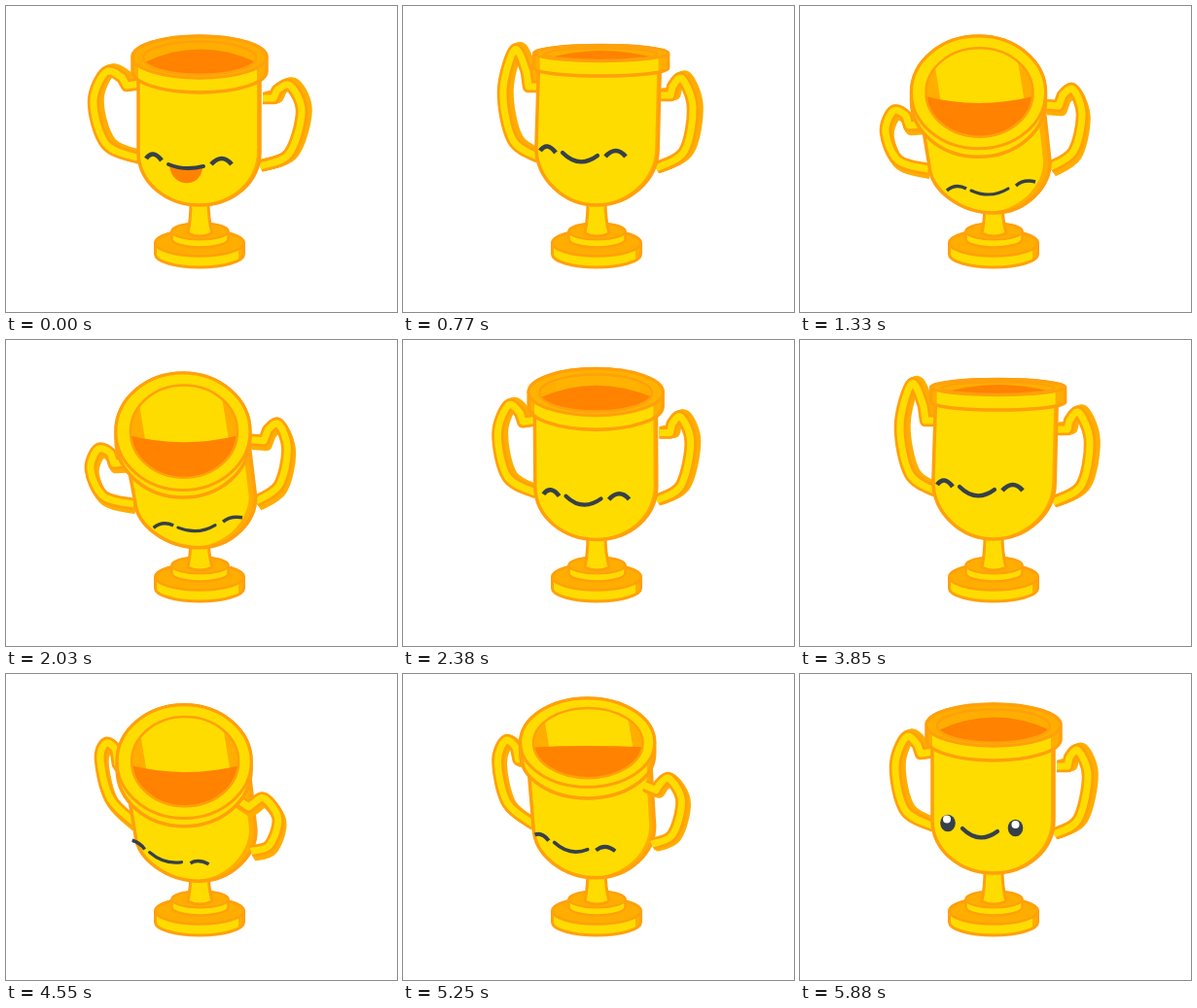
An HTML page with a canvas that plays this animation: 402x315 px, repeating every 6300 ms.

```html
<!DOCTYPE html>
<html lang="en">
<head>
<meta charset="utf-8">
<title>Happy cup</title>
<style>
  html, body { margin: 0; width: 100%; height: 100%; overflow: hidden; background: #fff; }
  canvas { display: block; width: 402px; height: 315px; }
</style>
</head>
<body>
<canvas id="stage" width="402" height="315"></canvas>
<script>
const g = document.getElementById('stage').getContext('2d');
const LOOP = 6300, STEP = 70;
const YELLOW = '#ffdc00', AMBER = '#ffae00', LINE = '#ffa00c', DEEP = '#ff8200', INK = '#36404a';

// Handle points: rim, elbow, knuckle, top, side, low, foot.
const rest = {
  left: [138,80, 124,82, 121,73, 109,65, 98,95, 108,140, 138,157],
  right: [264,95, 275,95, 277,86, 286,79, 296,105, 286,150, 261,165]
};
const back = {
  left: [139,83, 129,83, 127,68, 115,45, 103,88, 113,138, 140,156],
  right: [262,92, 275,92, 277,83, 287,75, 298,105, 289,150, 260,167]
};
const bowRight = {
  left: [126,122, 112,123, 109,113, 96,108, 88,130, 101,159, 132,168],
  right: [252,102, 266,103, 270,92, 281,86, 290,112, 281,150, 257,166]
};
const bowLeft = {
  left: [122,92, 115,92, 113,78, 103,71, 97,88, 107,128, 132,153],
  right: [238,128, 250,136, 255,132, 266,127, 280,148, 271,176, 252,182]
};
// Face arcs (start, control, end): left eye, mouth, right eye.
rest.face = [144,157, 151,147, 160,159, 167,159, 184,176, 203,162, 211,163, 222,151, 232,163];
bowRight.face = [151,190, 160,182, 171,188, 176,190, 196,199, 214,188, 222,185, 230,178, 242,181];
bowLeft.face = [130,171, 138,173, 143,180, 148,183, 163,196, 181,193, 190,194, 198,189, 209,195];
back.face = rest.face.map((v, i) => v + (i % 2 ? -8 : -3));

// Tilt over a bow: [step, tilt]; 0 upright, 1 bowed, below 0 leaning back.
const tiltKeys = [[-1,0], [4,-.3], [5,-.3], [9,.67], [12,1], [22,1.1], [25,.6], [28.5,-.3], [34,0]];

const mix = (a, b, k) => a + (b - a) * k;
const blend = (a, b, k) => a.map((v, i) => mix(v, b[i], k));
const clamp = v => Math.min(1, Math.max(0, v));

function tiltAt(s) {
  if (s <= -1 || s >= 34) return 0;
  const i = tiltKeys.findIndex(k => s < k[0]);
  const [s0, v0] = tiltKeys[i - 1], [s1, v1] = tiltKeys[i];
  const u = (s - s0) / (s1 - s0);
  return mix(v0, v1, u * u * (3 - 2 * u));
}

function shade(k) {
  return `rgb(255,${Math.round(mix(174, 220, clamp(k)))},0)`;
}

function paint(path, fill, stroke, width) {
  if (fill) { g.fillStyle = fill; g.fill(path); }
  if (stroke) { g.strokeStyle = stroke; g.lineWidth = width; g.stroke(path); }
}

function oval(x, y, rx, ry) {
  const p = new Path2D();
  p.ellipse(x, y, rx, ry, 0, 0, 7);
  return p;
}

function drum(x, y, rx, ry, h) {
  const p = new Path2D();
  p.ellipse(x, y, rx, ry, 0, Math.PI, 2 * Math.PI);
  p.ellipse(x, y + h, rx, ry, 0, 0, Math.PI);
  p.closePath();
  return p;
}

function clipped(path, draw) {
  g.save();
  g.clip(path);
  draw();
  g.restore();
}

function drawBase() {
  const low = drum(199, 244, 45.5, 13.5, 11.5);
  paint(low, YELLOW);
  clipped(low, () => { g.fillStyle = AMBER; g.fillRect(239, 240, 10, 32); });
  paint(low, null, LINE, 3);
  paint(oval(199, 244, 45.5, 13.5), AMBER, LINE, 2.5);
  paint(drum(199.5, 232, 29, 8.5, 8), YELLOW, LINE, 2.5);
  paint(oval(199.5, 232, 29, 8.5), AMBER, LINE, 2);
  paint(new Path2D('M190 200 Q190 220 187 234 Q199 240 212 234 Q208 220 208 200Z'), YELLOW, LINE, 3);
}

function handlePath(p) {
  const path = new Path2D();
  const at = i => [p[2 * i], p[2 * i + 1]];
  path.moveTo(...at(0));
  path.lineTo(...at(1));
  path.lineTo(...at(2));
  for (let i = 2; i < 6; i++) {
    const a = at(i - 1), b = at(i), c = at(i + 1), d = at(Math.min(6, i + 2));
    path.bezierCurveTo(b[0] + (c[0] - a[0]) / 6, b[1] + (c[1] - a[1]) / 6,
      c[0] - (d[0] - b[0]) / 6, c[1] - (d[1] - b[1]) / 6, ...c);
  }
  return path;
}

function drawHandle(points, q) {
  const path = handlePath(points), f = clamp(q);
  g.lineJoin = 'round';
  for (let i = 4; i >= 0; i--) {
    g.save();
    g.translate(mix(4.5, 2.5, f) * i / 4, mix(-1.5, 4, f) * i / 4);
    paint(path, null, i ? AMBER : LINE, 12.5);
    g.restore();
  }
  paint(path, null, YELLOW, 7);
}

function drawBody(q) {
  const tl = [136 - 12 * q, 70 + 40 * q], sl = [136 - 3 * q, 150 + 15 * q];
  const tr = [261 - 11 * q, 70 + 25 * q], sr = [261 - 4 * q, 150 + 10 * q];
  const bottom = 205 + 8 * Math.max(0, q), f = clamp(q);
  const drop = 32 - 7 * f;
  const p = new Path2D();
  p.moveTo(...tl);
  p.lineTo(...sl);
  p.bezierCurveTo(sl[0] + 2 * f, sl[1] + drop, 165, bottom, 199, bottom);
  p.bezierCurveTo(233, bottom, sr[0] + f, sr[1] + drop, ...sr);
  p.lineTo(...tr);
  p.closePath();
  paint(p, AMBER);
  clipped(p, () => {
    g.translate(-3 - 4 * f, -1);
    paint(p, YELLOW);
    g.fillStyle = YELLOW;
    g.fillRect(120, 90, 60, 130);
  });
  paint(p, null, LINE, 3.5);
}

function drawRim(q) {
  const e = (18.3 + 38.7 * q) * Math.PI / 180, f = clamp(q);
  const x = 199 - 15.5 * q, y = 138 - 90 * Math.cos(e);
  const rx = 69, ry = 69 * Math.sin(e), h = 15.5 * Math.cos(e);
  const band = drum(x, y, rx, ry, h);
  paint(band, YELLOW);
  clipped(band, () => {
    g.fillStyle = AMBER;
    g.fillRect(x - 72, y, 9 - 3 * f, 90);
    g.fillRect(x + 59 + 4 * f, y, 14, 90);
  });
  paint(band, null, LINE, 3.5);
  paint(oval(x, y, rx, ry), shade(q * 2), LINE, 3);

  const ix = 58 - 3 * f, iy = ry * .79;
  const hole = oval(x + f, y + 1 - f, ix, iy);
  paint(hole, shade(q * 2));
  clipped(hole, () => {
    g.translate(x, y);
    paint(new Path2D('M-70 -60L-50 -60L-38 14L-70 14Z M70 -60L36 -60L48 14L70 14Z'), AMBER);
    const edge = mix(6, 4, f), mid = mix(-22, 18, f) * (q < 0 ? 1 + q * 1.6 : 1);
    paint(new Path2D(`M${-ix} ${edge}Q0 ${mid} ${ix + 2} ${edge}V80H${-ix}Z`), DEEP);
  });
  paint(hole, null, LINE, 2.5);
}

function drawFace(a, q, open, laugh) {
  const arc = i => new Path2D(
    `M${a[i]} ${a[i + 1]}Q${a[i + 2]} ${a[i + 3]} ${a[i + 4]} ${a[i + 5]}`);
  const width = 4.6 - clamp(q) * 1.1;
  if (open) {
    [[152, 153.5, 151, 149.5], [221.5, 158.5, 221.5, 155]].forEach(([x, y, hx, hy]) => {
      paint(oval(x, y, 7.8, 8.8), INK);
      paint(oval(hx, hy, 4, 4), '#fff');
    });
  } else {
    paint(arc(0), null, INK, width);
    paint(arc(12), null, INK, width);
  }
  g.lineCap = 'round';
  if (laugh > 0) {
    const d = 166 + 17 * laugh;
    paint(new Path2D(`M168 164Q185 170 202 166C201 ${d + 5} 170 ${d + 5} 168 164Z`), DEEP);
    const lip = mix(176, 170, laugh);
    paint(new Path2D(`M167 ${mix(159, 163, laugh)}Q184 ${lip} 203 ${mix(162, 165, laugh)}`), null, INK, 4);
  } else {
    paint(arc(6), null, INK, width - .4);
  }
  g.lineCap = 'butt';
}

function spread(points, side, k) {
  const weight = [0, 0, .2, .8, 1, .6, 0];
  return points.map((v, i) => v + k * (i % 2 ? 4 * weight[i >> 1] : side * 8 * weight[i >> 1]));
}

function draw(t) {
  const second = t >= 3185;
  const s = (t - (second ? 3500 : 490)) / STEP;
  const q = tiltAt(s);
  const laugh = t < 210 ? [1, .6, .2][Math.floor(t / STEP)] : 0;
  const goal = q < 0 ? back : second ? bowLeft : bowRight;
  const k = q < 0 ? -q / .3 : q;
  const part = name => blend(rest[name], goal[name], k);
  const left = spread(part('left'), -1, laugh);
  const right = spread(part('right'), 1, laugh);
  const inFront = second && q > .5;

  g.fillStyle = '#fff';
  g.fillRect(0, 0, 402, 315);
  drawBase();
  drawHandle(left, q);
  if (!inFront) drawHandle(right, q);
  drawBody(q);
  if (inFront) drawHandle(right, q);
  drawRim(q);
  drawFace(part('face'), q, laugh < .5 && (s < 1 || s >= 32), laugh);
}

const start = performance.now();
function tick() {
  const t = (performance.now() - start) % LOOP;
  draw(Math.floor(t / STEP) * STEP);
  requestAnimationFrame(tick);
}
tick();
</script>
</body>
</html>
```
